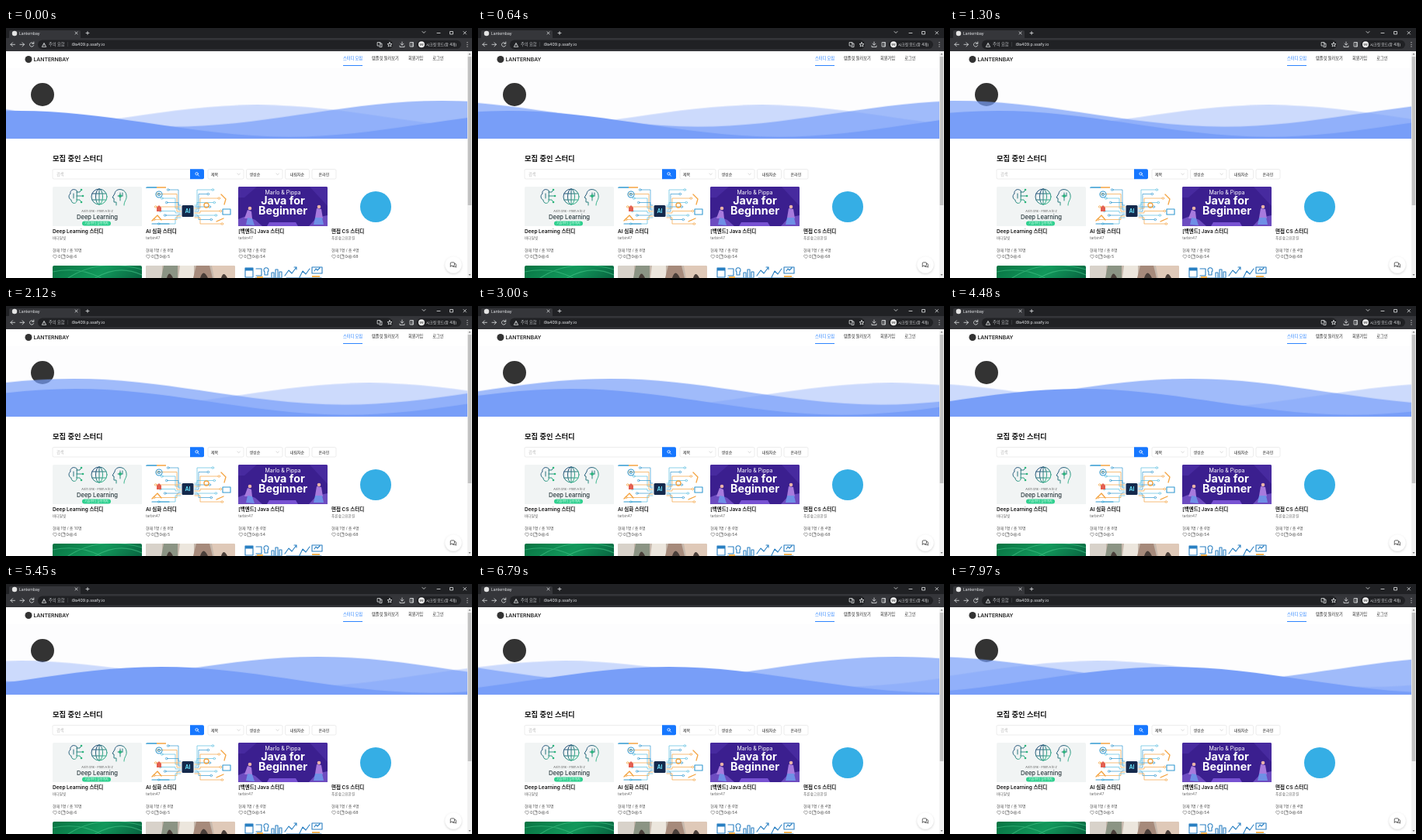
These frames come from a looping animation (600 by 323 pixels, 8000 ms). An HTML page:

```html
<!DOCTYPE html>
<html lang="ko">
<head>
<meta charset="utf-8">
<style>
html, body { margin: 0; width: 100%; height: 100%; overflow: hidden; background: #fff; }
svg { display: block; }
#stage { width: 100vw; height: 100vh; }
text { font-family: Inter, 'Noto Sans CJK KR', 'Noto Sans CJK', sans-serif; fill: #222; }
.line { fill: none; stroke-linecap: round; stroke-linejoin: round; }
</style>
</head>
<body>
<svg id="stage" viewBox="0 0 600 323">
  <defs>
    <path id="wave" d="M-160 44c30 0 58-18 88-18s58 18 88 18 58-18 88-18 58 18 88 18v44h-352z"/>
    <linearGradient id="mint" x2="1" y2="1"><stop stop-color="#203d75"/><stop offset="1" stop-color="#35c28a"/></linearGradient>
    <linearGradient id="forest" x2="1" y2=".5"><stop stop-color="#087443"/><stop offset=".5" stop-color="#12985b"/><stop offset="1" stop-color="#065b3b"/></linearGradient>
    <clipPath id="page"><rect y="28" width="594" height="295"/></clipPath>
    <clipPath id="cover"><path d="M0 51V2q0-2 2-2h111q2 0 2 2v49z"/></clipPath>
    <filter id="soft" x="-50%" y="-50%" width="200%" height="200%"><feDropShadow dx="0" dy="1" stdDeviation="1.6" flood-opacity=".2"/></filter>
  </defs>
  <rect width="600" height="323" fill="#fff"/>

  <!-- browser -->
  <rect width="600" height="14" fill="#202124"/>
  <path d="M2 14q2 0 2-2V5q0-2 2-2h88q2 0 2 2v7q0 2 2 2z" fill="#35363a"/>
  <rect y="13" width="600" height="17" fill="#35363a"/>
  <rect x="41" y="15.500" width="457" height="12" rx="6" fill="#202124"/>
  <circle cx="11" cy="7" r="3.200" fill="#e4e4e4"/>
  <g class="line" stroke="#e4e6e8" stroke-width=".8">
    <path d="M89 5l3 3m0-3l-3 3M103 6.500h4m-2-2v4M536 4.500l2 2 2-2M555 6.500h4M572 4.500h3.500v3.500h-3.500zM589 4.500l3.500 3.500m0-3.500l-3.500 3.500"/>
    <path d="M11.500 21.300H6m2.500-2.500L6 21.300l2.500 2.500M18 21.300h5.500m-2.500-2.500l2.500 2.500-2.500 2.500"/>
    <path d="M35.500 20a2.700 2.700 0 1 0 .2 2.500M35.800 18v2.300h-2.300"/>
    <path d="M46.500 24l2.500-4.700 2.500 4.700zM49 21v1.200"/>
    <path d="M478.500 18.500h3.500v4.500h-3.500zM481 20h3v4.500h-3M494 18.500l.8 2 2.200.1-1.700 1.300.6 2.100-1.900-1.200-1.900 1.200.6-2.100-1.700-1.300 2.200-.1z"/>
    <path d="M510 18v4m-2-1.800l2 2 2-2M507 23v1.500h6V23M520.500 18.500h4v5.500h-4zM523 18.500V24"/>
  </g>
  <rect x="529" y="15.800" width="57" height="11" rx="5.500" fill="#202124"/>
  <circle cx="535" cy="21.300" r="4" fill="#eee"/>
  <path d="M532.500 21h5m-4 1.500h.8m1.500 0h.8" stroke="#333" stroke-width=".9"/>
  <g fill="#ddd"><circle cx="594" cy="18.700" r=".6"/><circle cx="594" cy="21.300" r=".6"/><circle cx="594" cy="23.900" r=".6"/></g>

  <!-- header and hero -->
  <circle cx="29" cy="40.500" r="4.500" fill="#333"/>
  <rect x="434" y="48" width="25" height=".9" fill="#1677ff"/>
  <rect y="52" width="594" height="90.500" fill="#fdfdfe"/>
  <circle cx="47" cy="86" r="15" fill="#333"/>
  <svg y="90" width="594" height="52.500" viewBox="0 24 150 28" preserveAspectRatio="none" fill="#789ef8">
    <g class="drift"><use href="#wave" x="48" y="0" opacity=".7"/></g>
    <g class="drift"><use href="#wave" x="48" y="3" opacity=".37"/></g>
    <g class="drift"><use href="#wave" x="48" y="7"/></g>
  </svg>

  <!-- scrollbar -->
  <rect x="594" y="30" width="6" height="293" fill="#f1f1f1"/>
  <rect x="594.700" y="37" width="4.600" height="192" fill="#c1c1c1"/>
  <path d="M595.500 34.500l1.500-2 1.500 2zM595.500 318l1.500 2 1.500-2z" fill="#777"/>

  <!-- search row -->
  <g fill="#fff" stroke="#d9d9d9" stroke-width=".5">
    <rect x="60" y="182.500" width="178" height="12.500" rx="1.800"/>
    <rect x="260" y="182.500" width="46" height="12.500" rx="1.800"/>
    <rect x="309.500" y="182.500" width="46.500" height="12.500" rx="1.800"/>
    <rect x="359.500" y="182.500" width="31" height="12.500" rx="1.800"/>
    <rect x="394" y="182.500" width="31" height="12.500" rx="1.800"/>
  </g>
  <path d="M237 182.300h16q2 0 2 2v9q0 2-2 2h-16z" fill="#1677ff"/>
  <g class="line" stroke-width=".8"><path d="M247 189.700l1.500 1.500" stroke="#fff"/><circle cx="245.600" cy="188.300" r="1.700" stroke="#fff"/>
    <path d="M298 188l1.700 1.700 1.700-1.700M348 188l1.700 1.700 1.700-1.700" stroke="#bbb" stroke-width=".6"/></g>

  <g clip-path="url(#page)">
    <g transform="translate(60 205)" clip-path="url(#cover)">
      <rect width="115" height="51" fill="#f1f4f4"/>
      <g class="line" stroke="url(#mint)" stroke-width="1">
        <path d="M31 5c-5-4-9 1-8 4-4 3-1 8 1 8 0 5 6 6 7 2zM31 7h4l2-3M31 12h7M31 17h4l2 3M27 9v6"/>
        <circle cx="60" cy="13" r="10"/><ellipse cx="60" cy="13" rx="4.500" ry="10"/><path d="M51 9h18M51 17h18M60 3v20"/>
        <path d="M82 24v-4h-3v-5l-2-1 3-5c1-8 14-7 15 2 1 6-3 7-3 13M87 8v10M84 12h6M90 8v4"/>
      </g>
      <g fill="#2cb57c"><circle cx="37" cy="4" r="1.300"/><circle cx="39" cy="12" r="1.300"/><circle cx="37" cy="20" r="1.300"/><circle cx="87" cy="12" r="2"/></g>
      <rect x="38" y="44.500" width="37" height="6" rx="3" fill="#2fd08f"/>
    </g>
    <g transform="translate(180 205)" clip-path="url(#cover)">
      <rect width="115" height="51" fill="#fff"/>
      <g id="circuit" class="line" stroke-width=".7"></g>
      <path d="M0 1h14" stroke="#3198d0" stroke-width="1.500"/><path d="M14 1h12" stroke="#f4a340" stroke-width="1.500"/>
      <g class="line" stroke="#f4a340" stroke-width="1.300"><path d="M8 44l7-7 5 6M97 10l6 6-2 7M91 45l9-4"/><circle cx="78" cy="24" r="3"/></g>
      <g class="line" stroke="#3198d0" stroke-width="1.100"><circle cx="17" cy="10" r="4"/><circle cx="17" cy="10" r="1.500"/><path d="M99 29h10v7H99zM8 48h22"/></g>
      <path d="M14 32v-5l3-3 3 3v5z" fill="#e35f50"/>
      <rect x="46.500" y="24" width="15" height="15" rx="1.500" fill="#14294c"/>
    </g>
    <g transform="translate(299 205)" clip-path="url(#cover)">
      <rect width="115" height="51" fill="#3b1f8f"/>
      <path d="M0 0h24L8 14H0zM92 0h23v25z" fill="#472a9f"/>
      <path d="M0 51V42l10-4 12 5 9 8zM115 51V37l-14 3-10 11z" fill="#6d4cc0"/>
      <path d="M8 41l4-11 5 2 1 9zM99 40l2-12 6 1 2 12z" fill="#a77add"/>
      <path d="M10 49l2-9 6 1 3 9zM97 49l2-9h9l2 9z" fill="#6f8fe6"/>
      <g fill="#e9b3a8"><circle cx="15" cy="28" r="2.300"/><circle cx="104" cy="26" r="2.300"/></g>
      <path d="M40 46h34l3 5H37z" fill="#7852d2"/>
    </g>
    <circle cx="476" cy="231" r="20" fill="#35aee5"/>
    <g transform="translate(60 307)" clip-path="url(#cover)">
      <rect width="115" height="51" fill="url(#forest)"/>
      <path d="M0 8q35-7 62 8M20 16Q60-10 115 5M55 16Q85-2 115 12" class="line" stroke="#48c98a" stroke-width="1.200" opacity=".55"/>
    </g>
    <g transform="translate(180 307)" clip-path="url(#cover)">
      <rect width="115" height="51" fill="#c6b8ac"/>
      <path d="M0 0h21v16H0z" fill="#d8d2ca"/><path d="M23 0h18v16H20z" fill="#8b9484"/><path d="M44 0h18v16H42z" fill="#ece6dd"/><path d="M65 0h17l4 16H61z" fill="#a68a7b"/><path d="M85 0h30v16H88z" fill="#dfc9b8"/>
      <path d="M27 16q3-11 8 0zM70 16q4-13 10 0zM97 16q3-10 8 0z" fill="#4a3f3a"/>
    </g>
    <g transform="translate(299 307)">
      <g class="line" stroke="#287fc2" stroke-width="1.100">
        <path d="M9 3h10v12H9zM9 6h10M23 4h7v9h-7M34 8a3 3 0 1 1 4 0v4h-4zM43 15V9h3v6M48 15V5h3v10M53 15V8h3v7"/>
        <path d="M60 13l5-7 4 4 6-8M72 2h3v3M79 15l4-8 4 4 5-7M95 2h13v8H95zM98 7l2-3 2 2 3-3M22 16h34M62 16h45"/>
      </g>
      <path d="M24 14h8v2h-8zM95 13h10v2H95z" fill="#f4b352"/><path d="M9 3h10v3H9z" fill="#287fc2"/>
    </g>
  </g>
  <g id="stats" class="line" stroke="#666" stroke-width=".6"></g>
  <g id="labels"></g>

  <circle cx="576" cy="306" r="10.500" fill="#fff" filter="url(#soft)"/>
  <g class="line" stroke="#333" stroke-width="1" transform="translate(576 305.500) scale(.75) translate(-577 -306)"><path d="M573 308.500l-1 1.500v-6q0-1.500 1.500-1.500h4q1.500 0 1.500 1.500v3q0 1.500-1.500 1.500zM580.500 304.500q1 0 1 1.200v5.300l-1.500-1.200h-4"/></g>
</svg>
<script>
const NS = 'http://www.w3.org/2000/svg';
const byId = id => document.getElementById(id);
function add(parent, tag, attrs, content = '') {
  const el = document.createElementNS(NS, tag);
  for (const key in attrs) el.setAttribute(key, attrs[key]);
  el.textContent = content;
  parent.append(el);
}
function label(content, x, y, size, fill = '#222', weight = 400, anchor = 'start') {
  add(byId('labels'), 'text', { x, y, 'font-size': size, 'font-weight': weight, 'text-anchor': anchor, style: `fill:${fill}` }, content);
}

label('Lanternbay', 17, 8.700, 5, '#e8eaed');
label('주의 요함', 55, 23.300, 5.200, '#bfc2c6');
label('|', 79, 23, 5, '#5f6368');
label('i9a409.p.ssafy.io', 84.500, 23.400, 5.300, '#e8eaed');
label('시크릿 모드(창 4개)', 541, 23.200, 4.700, '#e8eaed');
label('LANTERNBAY', 35.500, 43, 6.800, '#222', 600);
const nav = [['스터디 모집', 446.500], ['템플릿 둘러보기', 488.500], ['회원가입', 527.500], ['로그인', 556.500]];
nav.forEach(([name, x], i) => label(name, x, 41.400, 5.200, i ? '#222' : '#1677ff', 500, 'middle'));
label('모집 중인 스터디', 60, 172.300, 9.300, '#111', 600);
label('검색', 65, 190.700, 5.200, '#bbb');
label('제목', 264, 190.700, 5);
label('생성순', 313.500, 190.700, 5);
label('내림차순', 375, 190.700, 5, '#222', 400, 'middle');
label('온라인', 409.500, 190.700, 5, '#222', 400, 'middle');

label('All in One - From A to Z', 117.500, 238, 3.700, '#555', 400, 'middle');
label('Deep Learning', 117.500, 247.300, 7.600, '#26363b', 500, 'middle');
label('기초부터 실무까지', 116.500, 254, 4, '#e8fff4', 500, 'middle');
label('AI', 234, 239, 7, '#64d9f2', 700, 'middle');
label('Marlo & Pippa', 356.500, 214.800, 7, '#fff', 400, 'middle');
label('Java for', 356.500, 228, 14.300, '#fff', 700, 'middle');
label('Beginner', 356.500, 240.600, 14.300, '#fff', 700, 'middle');

const cards = [
  [60, 'Deep Learning 스터디', '바다달빛', 10, 6],
  [180, 'AI 심화 스터디', 'tarbin47', 8, 5],
  [299.300, '[백엔드] Java 스터디', 'tarbin47', 6, 54],
  [419, '면접 CS 스터디', '푸른숲고요한길', 4, 68],
];
for (const [x, title, author, seats, views] of cards) {
  label(title, x, 265.300, 6.500, '#111', 600);
  label(author, x, 272.700, 4.700, '#666');
  label(`현재 1명 / 총 ${seats}명`, x, 289, 5, '#555');
  [[7, 0], [17.500, 0], [28, views]].forEach(([dx, n]) => label(n, x + dx, 297.200, 5.400, '#555'));
  add(byId('stats'), 'path', { transform: `translate(${x} 293)`,
    d: 'M3 4.500L.8 2.300C-.3.700 2-.9 3 1 4-.9 6.300.7 5.200 2.300zM12 0h4v4.800h-4zM14.500 0v1.500H16M21 2.500q3-4 6 0-3 4-6 0M23.200 2.500a.8.8 0 1 0 1.600 0a.8.8 0 1 0-1.600 0' });
}

// Traces fan out from the chip, each ending in a small ring.
for (let i = 0; i < 18; i++) {
  const side = i % 2 ? 1 : -1, row = Math.floor(i / 2);
  const x = 54 + side * (24 + i * 7 % 20), y = 4 + row * 5.500;
  const stroke = ['#3198d0', '#59bee0', '#f4a340'][i % 3];
  add(byId('circuit'), 'path', { stroke, d: `M${54 + side * 9} ${24 + row * 2}h${side * (3 + row % 3 * 2)}V${y}H${x}` });
  add(byId('circuit'), 'circle', { stroke, cx: x + side * 1.300, cy: y, r: 1.300 });
}

// Each layer drifts one wavelength; the clip opens well into the drift.
const LOOP = 8000, START = 8220;
const layers = [[7000, -2000], [10000, -3000], [20000, -5000]];
const drifts = [...document.querySelectorAll('.drift')].map((el, i) => {
  const [duration, delay] = layers[i];
  const drift = el.animate(
    [{ transform: 'translate(-90px, 0)' }, { transform: 'translate(85px, 0)' }],
    { duration, delay, iterations: Infinity, easing: 'cubic-bezier(.55, .5, .45, .5)' });
  drift.pause();
  return drift;
});
function frame() {
  const time = START + performance.now() % LOOP;
  for (const drift of drifts) drift.currentTime = time;
  requestAnimationFrame(frame);
}
frame();
</script>
</body>
</html>
```
